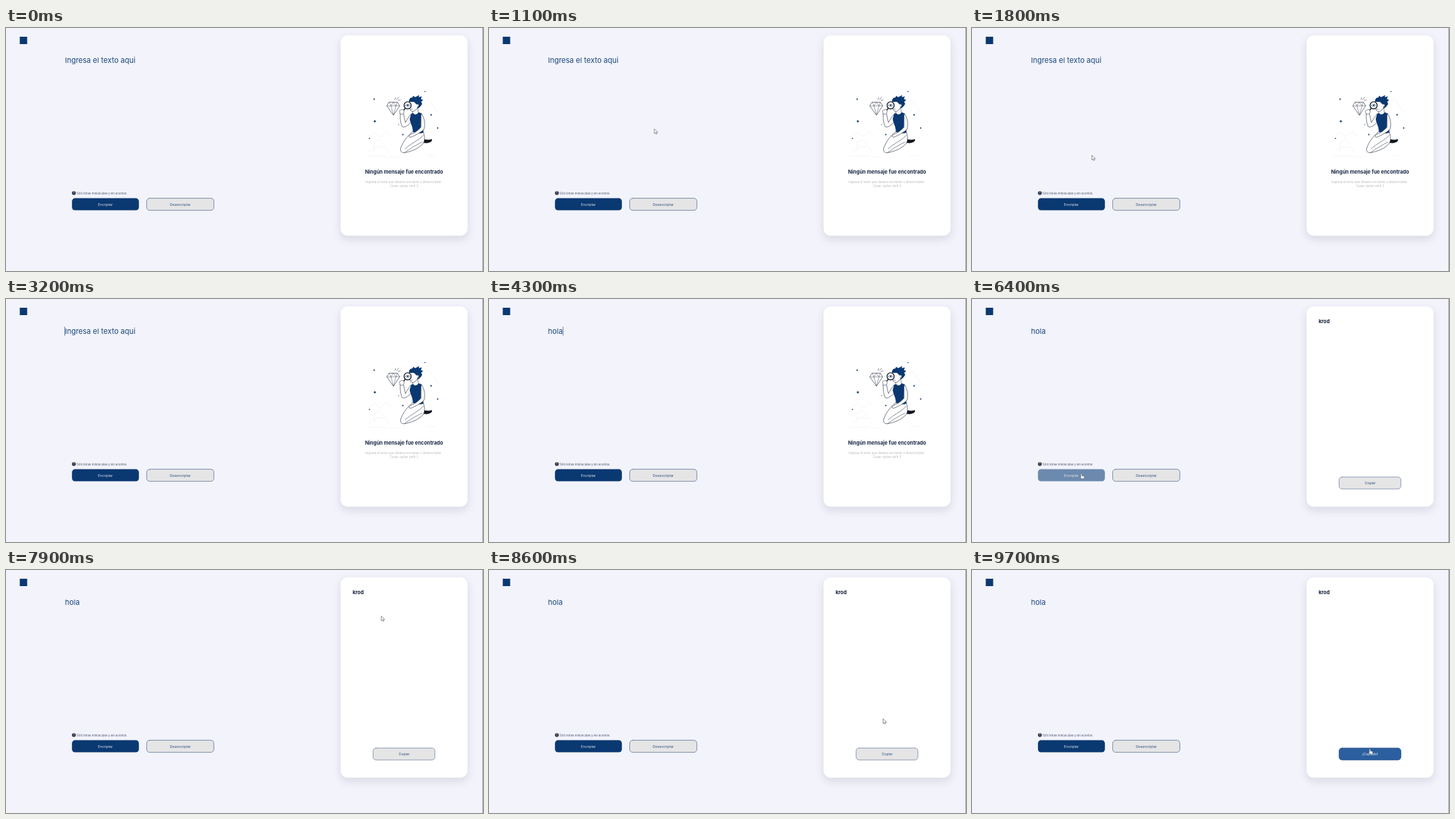
Recreate the animation shown at these times as an HTML page with a canvas. Size 710 by 362 pixels, loop 9800 ms.

```html
<!DOCTYPE html>
<html lang="es">
<head>
<meta charset="utf-8">
<title>Encriptador</title>
<style>
html, body { margin: 0; width: 100%; height: 100%; overflow: hidden; background: #f2f3fb; }
canvas { display: block; width: 710px; height: 362px; }
</style>
</head>
<body>
<canvas id="stage"></canvas>
<script>
const W = 710, H = 362, LOOP = 9800;
const NAVY = '#0a3871', INK = '#3a4152';
const canvas = document.getElementById('stage');
const ctx = canvas.getContext('2d');
const dpr = window.devicePixelRatio || 1;
canvas.width = W * dpr;
canvas.height = H * dpr;

// [time, x, y]; positions are interpolated within each run
const runs = [
  [[900, 262, 132], [1200, 238, 160], [1500, 200, 184], [1800, 178.5, 190], [2000, 172, 176], [2200, 172, 176]],
  [[5700, 172, 226], [5800, 161, 259.5], [7500, 161, 259.5], [7600, 205, 240], [7900, 558.5, 69],
   [8100, 540, 47], [8300, 545, 62], [8500, 578, 176], [8700, 595, 268], [8800, 592, 268],
   [9400, 592, 268], [9700, 590.5, 266], [9800, 590.5, 266]]
];
const typed = [[3600, 'h'], [3800, 'ho'], [4000, 'hol'], [4300, 'hola']];
const blinks = [[2200, 2700], [3200, 4800], [5300, 5800]];

function pointer(t) {
  for (const run of runs) {
    for (let i = 1; i < run.length; i++) {
      const [t0, x0, y0] = run[i - 1], [t1, x1, y1] = run[i];
      if (t >= t0 && t < t1) {
        const k = (t - t0) / (t1 - t0);
        return { x: x0 + (x1 - x0) * k, y: y0 + (y1 - y0) * k };
      }
    }
  }
  return null;
}

function rounded(x, y, w, h, r, fill, stroke) {
  ctx.beginPath();
  ctx.roundRect(x, y, w, h, r);
  ctx.fillStyle = fill;
  ctx.fill();
  if (stroke) {
    ctx.strokeStyle = stroke;
    ctx.lineWidth = 0.8;
    ctx.stroke();
  }
}

function label(str, x, y, size, color, align = 'left', weight = 400) {
  ctx.font = `${weight} ${size}px Inter, sans-serif`;
  ctx.textAlign = align;
  ctx.fillStyle = color;
  ctx.fillText(str, x, y);
}

function shape(d, fill, stroke, width = 0.7) {
  const p = new Path2D(d);
  if (fill) { ctx.fillStyle = fill; ctx.fill(p); }
  if (stroke) { ctx.strokeStyle = stroke; ctx.lineWidth = width; ctx.stroke(p); }
}

function dot(x, y, r, color) {
  ctx.beginPath();
  ctx.arc(x, y, r, 0, Math.PI * 2);
  ctx.fillStyle = color;
  ctx.fill();
}

function star(x, y, r) {
  const q = r * 0.35;
  shape(`M${x} ${y - r}L${x + q} ${y - q}L${x + r} ${y}L${x + q} ${y + q}L${x} ${y + r}` +
        `L${x - q} ${y + q}L${x - r} ${y}L${x - q} ${y - q}Z`, NAVY);
}

function scenery() {
  shape('M537 191H566M571 192H584M538 163L549 155L557 162L566 154L572 160M541 184L551 177H565L571 187' +
        'M548 184V170L556 166L563 174M623 112L629 106L637 117L643 126M626 190H640', null, '#eceef2', 0.6);
}

function diamond() {
  shape('M570.5 110.5H582.5L586 115.8L576.7 130L567 116.2Z', '#fff', INK);
  shape('M567 116.2L586 115.8M570.5 110.5L573 116L576.7 130L580.5 116L582.5 110.5M573 116L576.5 110.5L580.5 116',
        null, INK, 0.5);
  shape('M579 106.5L580 103.5M581.5 106.5L584.5 103M583.5 108L587 107', null, INK, 0.6);
}

function seeker() {
  // legs and shoe
  shape('M619 164C625 167 629 167 634 165.5C635 169 631 171 626 171.5L620 171Z', '#10151f');
  shape('M606 154C598 160 591 169 587.5 179C586.5 184 589 186 593 185.8C603 184 614 180 621 172C624 167 623 160 621 154Z',
        '#fff', INK);
  shape('M621 160C614 168 602 172 594 180M593 185.8C599 181 611 174 619 170', null, INK, 0.6);
  // raised arm
  shape('M603 128C599 133 596 138 594.5 141L591.5 127L587.5 125.5C586 130 587 143 590 147C593 149 599 145 604 139Z',
        '#fff', INK);
  // neck and vest
  shape('M605 122L606 130H614L613 120Z', '#fff', INK, 0.6);
  shape('M603 128L606 126.5C608 130 612 129 614.5 125.5L619 127.5C622 137 622 147 621 156C616 158 609 157 605.5 154.5' +
        'C606 147 601 141 601 135Z', NAVY);
  // lowered arm
  shape('M618 128C623 132 624.5 144 622 151C617 156 609 160 602 163L599.5 161L603 158C609 156 614 152 617.5 148Z',
        '#fff', INK);
  // head and hair
  shape('M600 110C599 115 600 121 603.5 124C607 125.5 611 122 613 118L615 113L611 108Z', '#fff', INK);
  shape('M600 110C599.5 106 602 103 605 103.5L606 101L609 103L615 100L614.5 103L619 102L617.5 106L621 107' +
        'L618 110L619.5 113C617 117 615 119 612.5 120L612 114C609 113 609 110 606 110Z', NAVY);
  shape('M611 114C614 112.5 615.5 115 613 118', '#fff', INK, 0.5);
  shape('M602.5 121H605', null, INK, 0.6);
  // magnifier and hand
  shape('M594.5 119.3L589 126', null, '#1a2130', 1.5);
  ctx.beginPath();
  ctx.arc(597.8, 115.2, 5.3, 0, Math.PI * 2);
  ctx.fillStyle = '#fff';
  ctx.fill();
  ctx.strokeStyle = '#1a2130';
  ctx.lineWidth = 1.4;
  ctx.stroke();
  shape('M594.5 115.3Q598 111.8 601.5 115.3Q598 118.4 594.5 115.3Z', null, INK, 0.6);
  dot(598, 115.2, 1.1, NAVY);
  shape('M586 123L590 121L593 123.5L591.5 128L587 128.5Z', '#fff', INK, 0.6);
}

function emptyState() {
  scenery();
  diamond();
  seeker();
  [[548, 106, 1.7], [623.7, 94.7, 1.2], [549, 139, 2.3], [632.8, 129.3, 1.7], [642.5, 149, 1.6],
   [541, 164.5, 1.3], [590.7, 158.8, 1.6], [584.5, 144, 1]].forEach(s => star(...s));
  label('Ningún mensaje fue encontrado', 592.5, 216.8, 7.45, '#1c2b48', 'center', 700);
  label('Ingresa el texto que desees encriptar o desencriptar.', 592, 231, 4.55, '#b4b7bf', 'center');
  label('Cesar cipher shift 3', 592.5, 236.8, 4.55, '#b4b7bf', 'center');
}

function arrow(x, y) {
  shape(`M${x} ${y}v6.6l1.6-1.4l1.1 2.3l1.1-.5l-1-2.2h2.1Z`, '#fff', '#4a4a52', 0.6);
}

function hand(x, y) {
  shape(`M${x + 1} ${y + 1}q.8-1 1.5 0v2.7l2.8.6q.9.3.8 1.2l-.5 2.8h-3.6l-2-2.8q-.2-1 1-.3Z`, '#fff', '#4a5568', 0.5);
}

function draw(t) {
  const p = pointer(t);
  const done = t >= 6400;
  const over = (x, y, w, h) => p && p.x + 2 >= x && p.x <= x + w && p.y >= y - 1 && p.y <= y + h;
  const overEncrypt = over(98, 253, 100, 18);
  const overCopy = done && over(546, 265, 92, 18);

  ctx.setTransform(dpr, 0, 0, dpr, 0, 0);
  ctx.fillStyle = '#f2f3fb';
  ctx.fillRect(0, 0, W, H);
  ctx.fillStyle = '#a3a4ac';
  ctx.fillRect(709, 0, 1, H);

  ctx.fillStyle = NAVY;
  ctx.fillRect(20.5, 13, 11, 11);

  // input
  const text = typed.reduce((s, [at, v]) => t >= at ? v : s, '');
  label(text || 'Ingresa el texto aqui', 87.7, 51.8, 11, '#1b477c');
  if (blinks.some(([a, b]) => t >= a && t < b)) {
    const x = text ? 88 + ctx.measureText(text).width : 87.2;
    ctx.fillStyle = '#34558a';
    ctx.fillRect(x - 0.2, 41.5, 0.8, 13);
  }

  // hint and buttons
  dot(101, 245.8, 2.9, '#343a4a');
  label('!', 101, 247.4, 4.4, '#dfe2ea', 'center', 700);
  label('Sólo letras minúsculas y sin acentos.', 105, 248.4, 4.35, '#4a5266');
  rounded(98.2, 253.6, 99.6, 18, 4.5, overEncrypt ? '#6c89ae' : NAVY);
  label('Encriptar', 148, 264.8, 5.1, '#e6ebf4', 'center');
  rounded(209.4, 253.6, 100, 18, 4.5, '#e5e5e6', '#5f7499');
  label('Desencriptar', 259.4, 264.8, 5.1, '#2c4b7c', 'center');

  // result card
  ctx.save();
  ctx.shadowColor = 'rgba(60,62,80,.15)';
  ctx.shadowBlur = 13 * dpr;
  ctx.shadowOffsetY = 5 * dpr;
  rounded(498, 11, 189, 298.5, 11, '#fff');
  ctx.restore();

  if (done) {
    label('krod', 516, 36, 7.4, '#13203a', 'left', 700);
    rounded(546.4, 265.2, 92, 17.8, 4.5, overCopy ? '#2b5f9f' : '#e5e5e6', overCopy ? '#1d4a84' : '#7484a4');
    label(t >= 9200 ? '¡Copiado!' : 'Copiar', 592.6, 276.2, 5.2, overCopy ? '#f2f5fa' : '#2c4b7c', 'center');
  } else {
    emptyState();
  }

  if (p) (overEncrypt || overCopy ? hand : arrow)(p.x, p.y);
}

ctx.lineJoin = ctx.lineCap = 'round';
const start = performance.now();
function tick() {
  const t = (performance.now() - start) % LOOP;
  draw(Math.floor(t / 100) * 100);
  requestAnimationFrame(tick);
}
tick();
</script>
</body>
</html>
```
